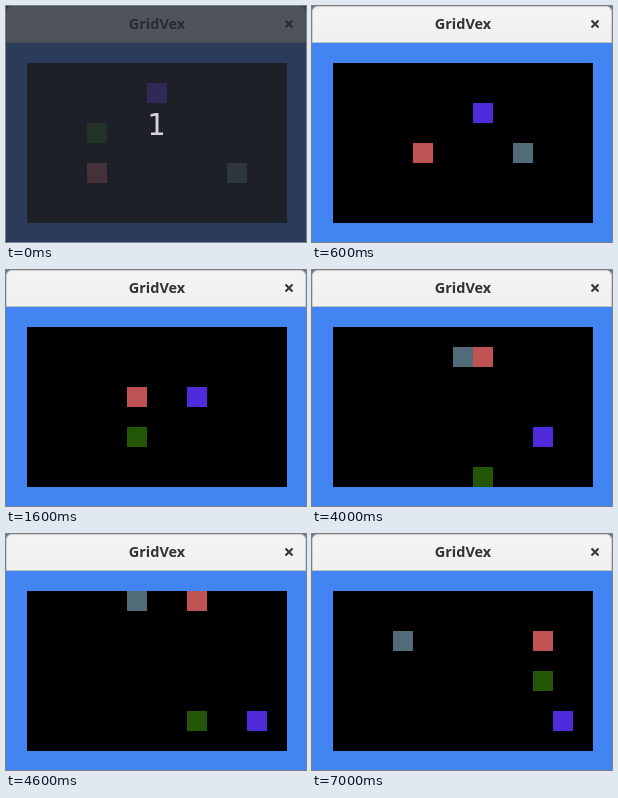
These frames come from a looping animation (300 px wide and 236 px high, 8000 ms). An HTML page:

```html
<!DOCTYPE html>
<html lang="en">
<head>
<meta charset="utf-8">
<style>
  html, body { margin: 0; width: 100%; height: 100%; overflow: hidden; }
  svg { display: block; width: 100%; height: 100%; }
  .title { font: bold 14.5px "Noto Sans", "Open Sans", sans-serif; fill: #2e3436; }
  .count { font: 30px "DejaVu Sans Mono", monospace; fill: #d3d5d8; }
  text { text-anchor: middle; }
</style>
</head>
<body>
<svg viewBox="0 0 300 236">
  <defs>
    <linearGradient id="bar" x2="0" y2="1">
      <stop stop-color="#f4f4f3"/>
      <stop offset="1" stop-color="#f0f0ef"/>
    </linearGradient>
  </defs>
  <rect width="300" height="36" fill="#777"/>
  <path d="M0 36V7Q0 0 7 0H293Q300 0 300 7V36Z" fill="url(#bar)"/>
  <path d="M.5 36V7Q.5 .5 7 .5H293Q299.5 .5 299.5 7V36" fill="none" stroke="#d0d0cf"/>
  <rect y="36" width="300" height="200" fill="#4184f2"/>
  <rect y="36" width="300" height="1" fill="#bfc3c9"/>
  <text class="title" x="151" y="23">GridVex</text>
  <path d="M279.5 14.5l7 7m0-7l-7 7" stroke="#2e3436" stroke-width="2"/>
  <rect x="21" y="57" width="260" height="160"/>
  <g id="blocks" shape-rendering="crispEdges"></g>
  <g id="countdown">
    <rect width="300" height="236" fill="#262932" fill-opacity=".79"/>
    <text class="count" x="150" y="129">1</text>
  </g>
</svg>
<script>
const LOOP = 8000, CELL = 20, LEFT = 21, TOP = 57, LAST_COL = 12, LAST_ROW = 7;
const COUNTDOWN_END = 500;
const stepTimes = [600, 1600, 3000, 4000, 4600, 5600, 7000];

// Start cell and direction, in painting order
const blocks = [
  { color: '#526b78', col: 10, row: 5, dx: -1, dy: -1 },
  { color: '#245608', col: 3, row: 3, dx: 1, dy: 1 },
  { color: '#bf5253', col: 3, row: 5, dx: 1, dy: -1 },
  { color: '#4f2bdc', col: 6, row: 1, dx: 1, dy: 1 },
];

const layer = document.getElementById('blocks');
const countdown = document.getElementById('countdown');

for (const block of blocks) {
  block.rect = document.createElementNS(layer.namespaceURI, 'rect');
  block.rect.setAttribute('width', CELL);
  block.rect.setAttribute('height', CELL);
  block.rect.setAttribute('fill', block.color);
  layer.append(block.rect);
}

// Reflect a coordinate at 0 and max
const bounce = (v, max) => max - Math.abs(max - Math.abs(v));

function draw(now) {
  const time = now % LOOP;
  const step = stepTimes.filter(t => t <= time).length;
  countdown.style.display = time < COUNTDOWN_END ? '' : 'none';
  for (const { rect, col, row, dx, dy } of blocks) {
    rect.setAttribute('x', LEFT + CELL * bounce(col + dx * step, LAST_COL));
    rect.setAttribute('y', TOP + CELL * bounce(row + dy * step, LAST_ROW));
  }
}

const start = performance.now();
function tick() {
  draw(performance.now() - start);
  requestAnimationFrame(tick);
}
tick();
</script>
</body>
</html>
```
